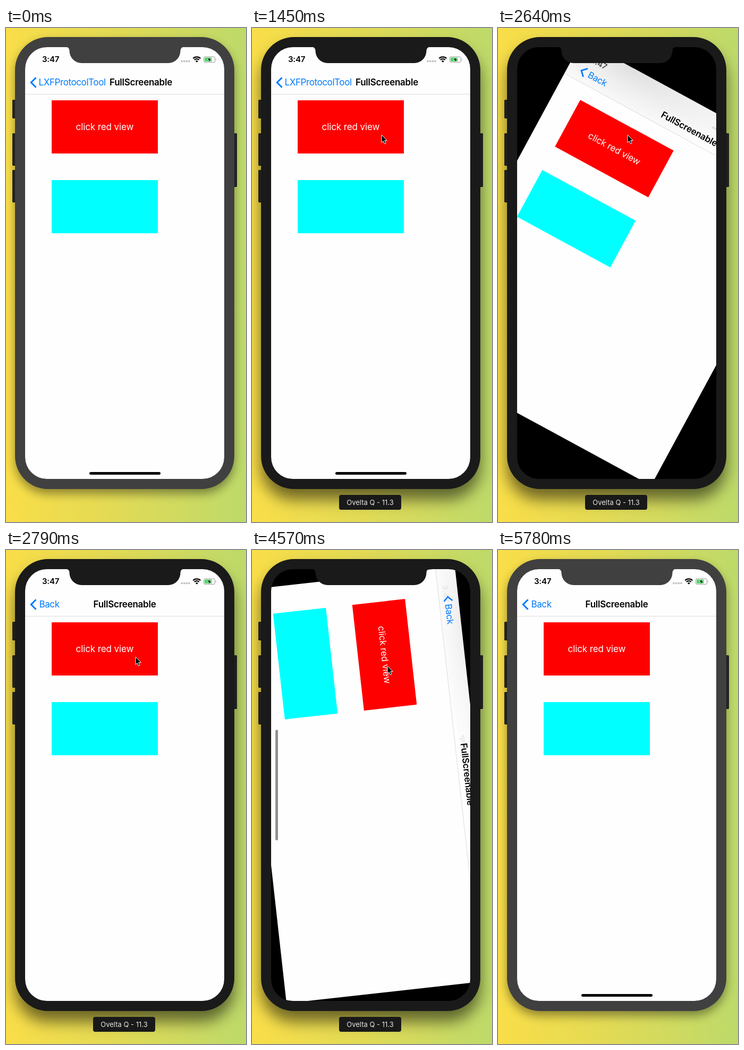
Write an HTML page that moves like this. It is 452 by 929 pixels and loops after 6210 ms.

```html
<!DOCTYPE html>
<html lang="en">
<head>
<meta charset="utf-8">
<title>Full screen rotation</title>
<style>
html, body { margin: 0; width: 100%; height: 100%; overflow: hidden; }
body { position: relative; background: linear-gradient(90deg, #f9de48, #e2da55 45%, #bdda6a); font: 17px Inter, sans-serif; white-space: nowrap; }
div, svg { position: absolute; }
#body { left: 17px; top: 17px; width: 413px; height: 850px; border-radius: 62px; background: var(--case); box-shadow: var(--shadow); }
.key { width: 6px; background: #2b2b2b; border-radius: 2px; box-shadow: inset 0 0 0 1px #1c1c1c; }
#screen { left: 36px; top: 36px; width: 375px; height: 812px; border-radius: 41px; background: #000; overflow: hidden; }
#view { background: #fefefe; overflow: hidden; }
.box { left: 50px; width: 200px; height: 100px; line-height: 100px; text-align: center; color: #fff; letter-spacing: -.1px; }
#nav { left: 0; top: 0; width: 100%; border-bottom: 1px solid #dcdcdc; }
#shade { width: 100%; height: 100%; background: radial-gradient(ellipse 290px 130% at 110px 0, #000, #0008 40%, #0000); }
#back, #title { line-height: 20px; letter-spacing: -.4px; }
#back { color: #007aff; }
#title { font-weight: 600; transform: translateX(-50%); letter-spacing: -.25px; }
#time { left: 32px; top: 13px; font-size: 15px; font-weight: 600; line-height: 20px; letter-spacing: -.2px; }
.home { background: #000; border-radius: 3px; }
#tip { left: 164px; top: 878px; width: 117px; height: 28px; border-radius: 4px; background: #191919; color: #e6e6e6; font-size: 13px; line-height: 29px; text-align: center; }
</style>
</head>
<body>
<div class="key" style="left:12px;top:135px;height:35px"></div>
<div class="key" style="left:12px;top:198px;height:61px"></div>
<div class="key" style="left:12px;top:267px;height:61px"></div>
<div class="key" style="left:429px;top:198px;height:101px"></div>
<div id="body"></div>
<div id="screen">
  <div id="view">
    <div class="box" style="top:100px;background:#f00">click red view</div>
    <div class="box" style="top:250px;background:#0ff"></div>
    <div id="nav">
      <div id="shade"></div>
      <div id="status">
        <div id="time">3:47</div>
        <svg width="375" height="44">
          <g fill="#c4c4c4"><circle cx="295" cy="26.5" r="2"/><circle cx="299.700" cy="26.500" r="2"/><circle cx="304.400" cy="26.500" r="2"/><circle cx="309" cy="26.500" r="2"/></g>
          <g fill="none" stroke="#000" stroke-width="2.300"><path d="M316.300 21.300a10 10 0 0 1 14 0M318.900 24a6.200 6.200 0 0 1 8.800 0"/></g>
          <path d="M323.300 28.700l-2.400-2.400a3.400 3.400 0 0 1 4.800 0z"/>
          <rect x="336.500" y="18" width="21" height="10.500" rx="2.500" fill="none" stroke="#999"/>
          <rect x="338" y="19.500" width="13.500" height="7.500" rx="1" fill="#4cd964"/>
          <path d="M359 21.500q2 1.700 0 3.500z" fill="#999"/>
          <path d="M348.500 18.500l-5.500 5.500h3.300l-1.300 4.500 6-6h-3.500z" stroke="#fff" stroke-width=".6"/>
        </svg>
      </div>
      <svg id="arrow" width="13" height="21" fill="none" stroke="#007aff" stroke-width="3"><path d="M11.500 1.200L2.300 10.500l9.200 9.300"/></svg>
      <div id="back"></div>
      <div id="title">FullScreenable</div>
    </div>
  </div>
  <div class="home" id="homeP" style="left:121px;top:799px;width:134px;height:5px"></div>
  <div class="home" id="homeL" style="left:8px;top:302px;width:5px;height:208px"></div>
</div>
<svg width="452" height="80"><path style="fill:var(--case)" d="M113 35.500q6.500 1 6.500 7.500a23 23 0 0 0 23 23h163a23 23 0 0 0 23-23q0-6.500 6.500-7.500z"/></svg>
<div id="tip">Ovelta Q - 11.3</div>
<svg id="cursor" width="14" height="20" style="left:0;top:0"><path d="M1 1v14.500l3.300-3 2.200 5.300 2.500-1-2.200-5.200h4.500z" stroke="#fff"/></svg>
<script>
const LOOP = 6210;
const STEPS = [0, 450, 600, 740, 890, 1040, 1170, 1300, 1450, 1600, 1750, 1900, 2040,
  2490, 2640, 2790, 2940, 3090, 3530, 3680, 3830, 3980, 4130,
  4570, 4720, 4870, 5020, 5170, 5320, 5470, 5780];
const TURNS = [1460, 2390, 3435, 4505];
const $ = id => document.getElementById(id);
const clamp = x => Math.min(1, Math.max(0, x));
const mix = (a, b, k) => a + (b - a) * k;
const smooth = x => x * x * (3 - 2 * x);
const place = (id, props) => {
  for (const k in props) $(id).style[k] = props[k] + 'px';
};

function cursorAt(t) {
  if (t < 1300) {
    const k = 1 - (1 - clamp((t - 400) / 770)) ** 2;
    return [mix(446, 244, k), mix(915, 200, k)];
  }
  const k = clamp((t - 4420) / 900);
  return [mix(243, 437, k ** 1.6), mix(200, 912, k ** 2.08)];
}

function draw(t) {
  // Odd turns go to landscape, even turns return to portrait.
  const n = TURNS.filter(s => s <= t).length;
  const age = n ? t - TURNS[n - 1] : 1e4;
  const turn = smooth(clamp(age / 400));
  const p = n % 2 ? turn : 1 - turn;

  const w = mix(375, 812, p), h = mix(812, 375, p);
  place('view', { width: w, height: h, left: (375 - w) / 2, top: (812 - h) / 2 });
  $('view').style.transform = `rotate(${90 * p}deg)`;

  const mid = mix(66, 16, p), long = t < 2490;
  place('nav', { height: mix(88, 32, p) });
  place('arrow', { left: mix(8.5, 55, p), top: mid - 10.5 });
  $('arrow').style.transform = `scale(${mix(1, .85, p)})`;
  $('back').textContent = long ? 'LXFProtocolTool' : 'Back';
  place('back', { left: mix(long ? 25.5 : 26.5, 71.5, p), top: mid - 10 });
  place('title', { left: mix(long ? 218 : 187.5, 406, p), top: mid - 10 });
  $('status').style.opacity = 1 - p;
  $('shade').style.opacity = .13 * Math.sqrt(4 * p * (1 - p));

  const fadeIn = clamp((age - 440) / 140), fadeOut = clamp(1 - age / 115);
  $('homeP').style.opacity = n % 2 ? fadeOut : fadeIn;
  $('homeL').style.opacity = n % 2 ? fadeIn : n ? fadeOut : 0;

  const active = t >= 1300 && t < 5780, root = document.body.style;
  root.setProperty('--case', active ? '#1a1a1a' : '#404040');
  root.setProperty('--shadow', active ? '0 20px 28px #0008' : '0 9px 18px #0006');
  $('tip').hidden = t < 740 || t >= 5780;

  const [x, y] = cursorAt(t);
  $('cursor').style.transform = `translate(${Math.round(x)}px, ${Math.round(y)}px)`;
  $('cursor').style.display = t >= 450 && t < 5470 ? 'block' : 'none';
}

const start = performance.now();
function frame(now) {
  const t = Math.max(0, now - start) % LOOP;
  draw(STEPS.findLast(s => s <= t));
  requestAnimationFrame(frame);
}
draw(0);
requestAnimationFrame(frame);
</script>
</body>
</html>
```
